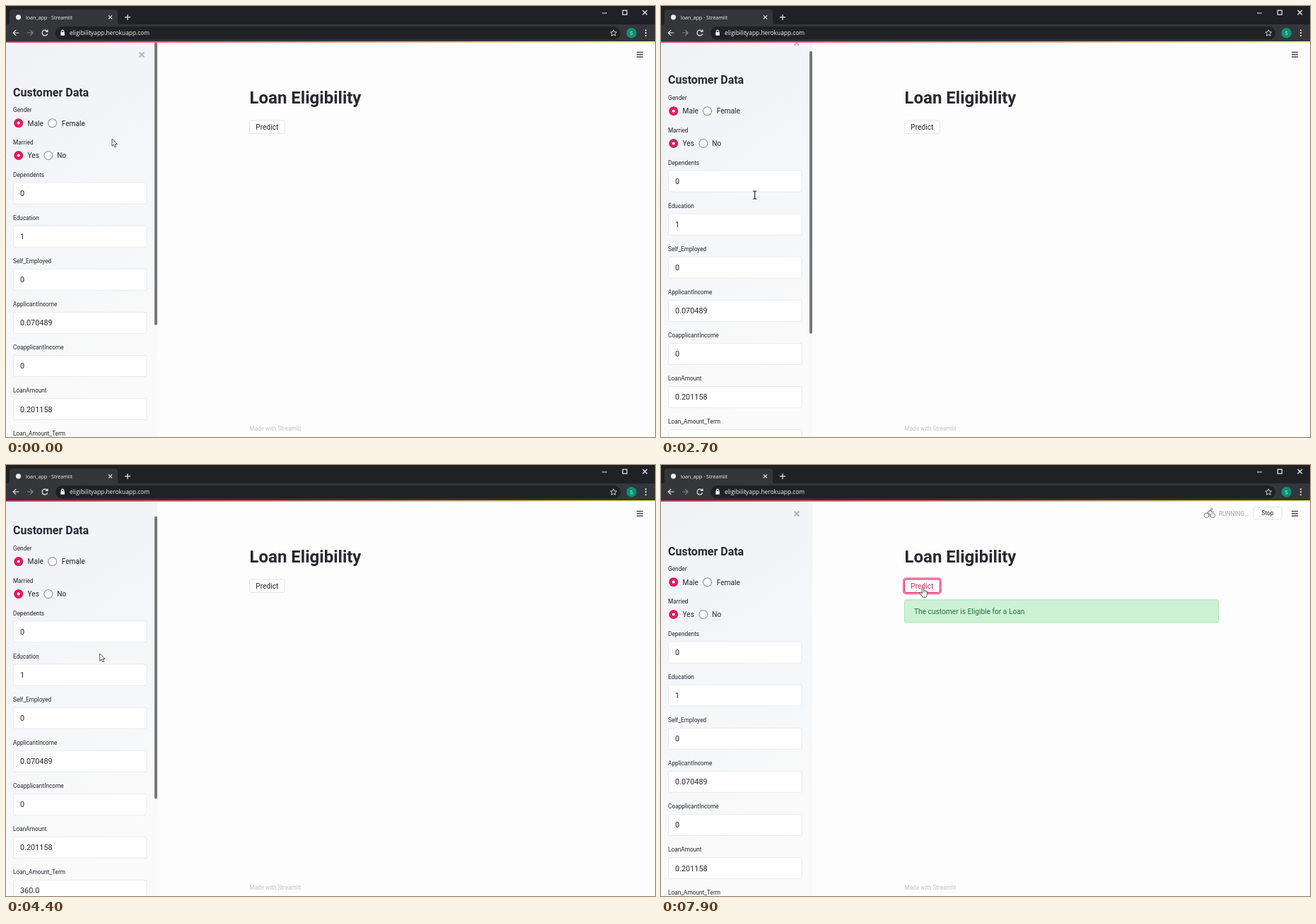
Write an HTML page that moves like this. It is 918 by 610 pixels and loops after 8 s.

```html
<!DOCTYPE html>
<html lang="en">
<head>
<meta charset="utf-8">
<title>Loan Eligibility</title>
<style>
  html, body { margin: 0; width: 100%; height: 100%; overflow: hidden; background: #fdfdfd; }
  svg { display: block; width: 918px; height: 610px; font-family: Roboto, "Noto Sans", sans-serif; fill: #262730; }
  .chrome { font-family: "Open Sans", "Noto Sans", sans-serif; fill: #f1f2f3; }
  .line { fill: none; stroke: #e8eaed; stroke-width: 1.2; }
  .label { font-size: 8.3px; }
  .body { font-size: 10.2px; }
  .value { font-size: 10.9px; }
  .heading { font-size: 16px; font-weight: 700; }
  .title { font-size: 24px; font-weight: 700; }
  .field { fill: #fefefe; stroke: #e9ebf0; }
  .button { fill: #fefefe; stroke: #e4e5ea; }
  .cursor { fill: #fff; stroke: #3c3c40; stroke-width: .9; stroke-linejoin: round; }
</style>
</head>
<body>
<svg viewBox="0 0 918 610">
  <defs>
    <linearGradient id="shade" x1="0" y1="0" x2=".25" y2="1">
      <stop offset="0" stop-color="#f0f2f6"/><stop offset="1" stop-color="#fafafa"/>
    </linearGradient>
    <linearGradient id="stripe">
      <stop offset="0" stop-color="#d92c58"/><stop offset="1" stop-color="#f4ee7c"/>
    </linearGradient>
    <clipPath id="view"><rect y="51" width="214" height="559"/></clipPath>
  </defs>

  <rect width="918" height="610" fill="#fdfdfd"/>
  <rect y="51" width="214" height="559" fill="url(#shade)"/>
  <g clip-path="url(#view)">
    <g id="form">
      <path d="M188.5 65.5l7 7m0-7l-7 7" fill="none" stroke="#b4b6bc" stroke-width="2"/>
      <text class="heading" x="10" y="127.5">Customer Data</text>
    </g>
  </g>
  <rect id="bar" x="210" width="4" height="400" rx="2" fill="#77787b"/>

  <text class="title" x="344.5" y="138.3">Loan Eligibility</text>
  <rect id="ring" x="343" y="160.5" width="52.8" height="21.5" rx="3.5" fill="none" stroke="#f27fa2" stroke-width="2.4"/>
  <rect id="predict" class="button" x="344.5" y="162" width="49.8" height="18.5" rx="2.5"/>
  <text id="predictText" class="body" x="369.3" y="174.8" text-anchor="middle">Predict</text>
  <g id="success">
    <rect x="344.5" y="190.8" width="444" height="32.2" rx="2.5" fill="#cdf1d5" stroke="#b0dfbb"/>
    <text class="body" x="358" y="210.8" fill="#24743b">The customer is Eligible for a Loan</text>
  </g>
  <g id="running">
    <g fill="none" stroke="#85868c" stroke-width="1">
      <circle cx="771.5" cy="71.5" r="3.3"/><circle cx="780.5" cy="71.5" r="3.3"/>
      <path d="M776 73v-3.5l-3-2 4-3.7 2 2.6h3" stroke-width="1.3"/>
      <circle cx="779" cy="62.5" r="1.3"/>
    </g>
    <text x="789" y="72.4" font-size="8.3" fill="#a3a4aa">RUNNING...</text>
    <rect class="button" x="838" y="59.5" width="40.3" height="17.5" rx="2.5"/>
    <text class="label" x="858" y="71.3" text-anchor="middle">Stop</text>
  </g>
  <path d="M892 65.5h9.2M892 68.8h9.2M892 72.1h9.2" fill="none" stroke="#4a4b52" stroke-width="1.5"/>
  <text x="344.5" y="601.2" font-size="8.2" fill="#c3c4ca">Made with Streamlit</text>

  <g class="chrome">
    <rect width="918" height="51" fill="#202124"/>
    <path d="M0 26H2Q5 26 5 22V9Q5 5 9 5H154Q158 5 158 9V22Q158 26 161 26H918V50.5H0Z" fill="#35363a"/>
    <rect x="70" y="29" width="799" height="18.6" rx="9.3" fill="#202124"/>
    <rect y="50" width="918" height="1.8" fill="url(#stripe)"/>
    <circle cx="17.5" cy="15.8" r="3.6" fill="#e9eaec"/>
    <text x="28" y="18.5" font-size="7.15">loan_app · Streamlit</text>
    <text x="90" y="41.2" font-size="8.4">eligibilityapp.herokuapp.com</text>
    <path class="line" d="M145 13.4l5 5m0-5l-5 5M168 15.9h8m-4-4v8M843 10h7M900.5 6l6.5 6.5m0-6.5l-6.5 6.5"/>
    <rect class="line" x="872.3" y="6.2" width="6" height="6" stroke-width="1"/>
    <path class="line" d="M18.3 38H10.4m3.8-3.9L10.2 38l4 3.9"/>
    <path class="line" d="M30 38h7.9m-3.8-3.9l4 3.9-4 3.9" style="stroke:#84868a"/>
    <path class="line" d="M58.2 35.8A3.9 3.9 0 1 0 58.7 39.2M58.9 33.4v3h-3"/>
    <rect x="77.3" y="36.9" width="5.6" height="4.8" rx=".6"/>
    <path class="line" d="M78.5 37v-1.2a1.6 1.6 0 0 1 3.2 0V37" stroke-width="1"/>
    <path class="line" d="M859.3 33.8l1.3 2.9 3.1.3-2.3 2.1.7 3.1-2.8-1.6-2.8 1.6.7-3.1-2.3-2.1 3.1-.3z" style="stroke-width:.9"/>
    <circle cx="884.7" cy="38.2" r="7.2" fill="#0c9276"/>
    <text x="884.7" y="41" font-size="7.6" text-anchor="middle">S</text>
    <circle cx="905" cy="34.4" r="1.1"/><circle cx="905" cy="38.2" r="1.1"/><circle cx="905" cy="42" r="1.1"/>
  </g>

  <g id="cursor" class="cursor">
    <path id="arrow" d="M0 0V10.3L2.4 8.1 4 11.8 5.8 11 4.2 7.4H7.4Z"/>
    <g id="hand">
      <path d="M-1.2 .8Q0-.8 1.1 .8V4.6Q2.2 4 2.9 5 4 4.5 4.7 5.5 6 5.2 6.2 6.6V9.8L4.9 12.8V14H-1V12.6L-4.2 8.6Q-4.3 6.8-2.8 7.2L-1.2 8.6Z"/>
      <path d="M1.1 4.6v2.6M2.9 5v2.5M4.7 5.5v2.2" stroke-width=".6"/>
    </g>
    <path id="beam" d="M-2.8 0H-.7L0 .6.7 0H2.8M0 .6V10.4M-2.8 11H-.7L0 10.4.7 11H2.8" fill="none" stroke="#222" stroke-width="1.1"/>
  </g>
</svg>
<script>
const LOOP = 8000;
const $ = id => document.getElementById(id);
const form = $('form');

function add(tag, attrs, text) {
  const el = document.createElementNS('http://www.w3.org/2000/svg', tag);
  for (const key in attrs) el.setAttribute(key, attrs[key]);
  if (text) el.textContent = text;
  form.append(el);
  return el;
}

function radio(cx, cy, textX, name) {
  const outer = add('circle', { cx, cy, r: 6.5 });
  const inner = add('circle', { cx, cy, fill: '#fefefe' });
  add('text', { class: 'body', x: textX, y: cy + 3.8 }, name);
  return on => {
    const mix = (a, b) => Math.round(a + (b - a) * on);
    outer.setAttribute('fill', `rgb(${mix(143, 232)},${mix(144, 22)},${mix(150, 92)})`);
    inner.setAttribute('r', 5.4 - 3.3 * on);
  };
}

add('text', { class: 'label', x: 10, y: 150 }, 'Gender');
const male = radio(17.7, 165.7, 30.5, 'Male');
const female = radio(65.6, 165.7, 78.7, 'Female');
add('text', { class: 'label', x: 10, y: 195.8 }, 'Married');
radio(17.7, 211.5, 30.5, 'Yes')(1);
radio(59.9, 211.5, 72.3, 'No')(0);

const fields = [
  ['Dependents', '0'], ['Education', '1'], ['Self_Employed', '0'],
  ['ApplicantIncome', '0.070489'], ['CoapplicantIncome', '0'], ['LoanAmount', '0.201158'],
  ['Loan_Amount_Term', '360.0'], ['Credit_History', '1'], ['Property_Area', '3']
];
fields.forEach(([name, value], i) => {
  const y = 239 + i * 61.1;
  add('text', { class: 'label', x: 10, y: y + 2.8 }, name);
  add('rect', { class: 'field', x: 10.5, y: y + 11, width: 188.5, height: 30, rx: 2 });
  add('text', { class: 'value', x: 20, y: y + 30 }, value);
});

// Rows: time, then the values held at that time.
const scrollSteps = [[2650, 0], [2850, 66.7], [3050, 133.5], [3150, 134], [3400, 200], [3600, 220.5],
  [3850, 220.5], [4100, 134], [4400, 29.3], [4550, 0]];
const cursorSteps = [[0, 150, 188], [100, 150, 188], [900, 88, 166], [1350, 88, 166], [1750, 31, 165],
  [2100, 31, 165], [2600, 132.7, 267], [4900, 132.7, 267], [6000, 370.5, 173]];
const kinds = [[0, 'arrow'], [720, 'hand'], [2180, 'arrow'], [2550, 'beam'], [4150, 'arrow'], [5900, 'hand']];

const ease = x => x * x * (3 - 2 * x);
const ramp = (t, start, length) => ease(Math.min(1, Math.max(0, (t - start) / length)));

function sample(steps, t, col, curve = x => x) {
  const i = steps.findIndex(s => s[0] > t);
  if (i < 0) return steps[steps.length - 1][col];
  if (i === 0) return steps[0][col];
  const a = steps[i - 1], b = steps[i];
  return a[col] + (b[col] - a[col]) * curve((t - a[0]) / (b[0] - a[0]));
}

const show = (id, on) => { $(id).style.display = on ? '' : 'none'; };

function draw(t) {
  const scroll = sample(scrollSteps, t, 1);
  const x = sample(cursorSteps, t, 1, ease);
  const y = sample(cursorSteps, t, 2, ease);
  const kind = kinds.filter(k => k[0] <= t).pop()[1];

  form.setAttribute('transform', `translate(0 ${-scroll})`);
  $('bar').setAttribute('y', 51.7 + scroll * .715);
  show('bar', x < 214);

  const picked = ramp(t, 1150, 200) - ramp(t, 1900, 200);
  female(picked);
  male(1 - picked);

  const hover = x > 344;
  $('predict').style.stroke = hover ? '#e32c61' : '';
  $('predictText').style.fill = hover ? '#d9305f' : '';
  show('ring', t >= 7000);
  show('running', t >= 7500);
  show('success', t >= 7700);

  const top = kind === 'beam' ? y - 5 : y;
  $('cursor').setAttribute('transform', `translate(${x} ${top})`);
  for (const id of ['arrow', 'hand', 'beam']) show(id, id === kind);
}

const start = performance.now();
function tick() {
  draw((performance.now() - start) % LOOP);
  requestAnimationFrame(tick);
}
tick();
</script>
</body>
</html>
```
